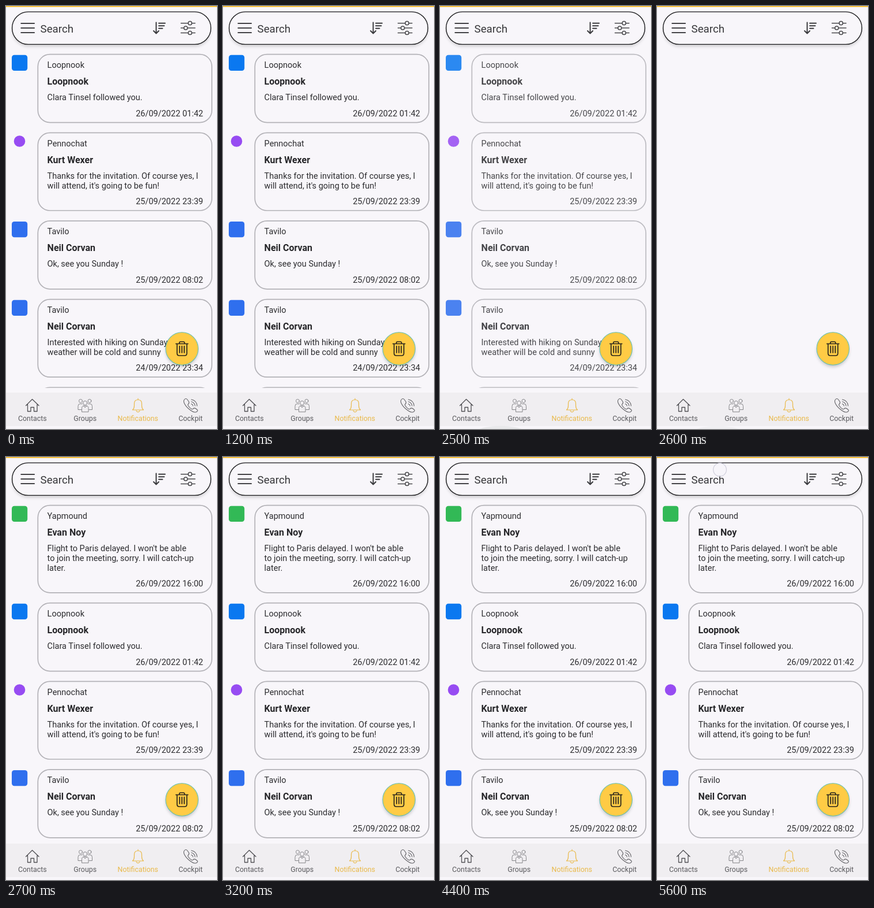
Write an HTML page that moves like this. It is 366 px wide and 732 px high and loops after 5700 ms.

```html
<!DOCTYPE html>
<html lang="en">
<head>
<meta charset="utf-8">
<title>Notifications</title>
<style>
  html, body { margin: 0; width: 100%; height: 100%; overflow: hidden; background: #f8f6fa; }
  svg { display: block; width: 100vw; height: 100vh; font-family: Roboto, "Noto Sans", sans-serif; }
  .line { fill: none; stroke-linecap: round; stroke-linejoin: round; }
  .card { fill: #f8f6fa; stroke: #b3b2b7; stroke-width: 1.7; }
  .body { font-size: 14.5px; fill: #2c2c2f; }
  .name { font-size: 16px; font-weight: 700; fill: #262629; }
  .date { text-anchor: end; }
  .tab { font-size: 12.4px; text-anchor: middle; fill: #5a5a5e; }
  .active { fill: #e9b949; }
</style>
</head>
<body>
<svg viewBox="0 0 366 732">
  <defs>
    <clipPath id="listArea"><rect y="70" width="366" height="591"/></clipPath>
    <filter id="soft" x="-20%" y="-40%" width="140%" height="190%"><feGaussianBlur stdDeviation="3"/></filter>
  </defs>
  <rect width="366" height="732" fill="#f8f6fa"/>

  <g clip-path="url(#listArea)">
    <g id="before"></g>
    <g id="after"></g>
  </g>

  <rect width="366" height="1.6" fill="#f9b81a"/>

  <g id="search">
    <rect x="12" y="14" width="342" height="55" rx="27" fill="#000" opacity=".22" filter="url(#soft)"/>
    <rect x="10.6" y="10.1" width="344.8" height="56.3" rx="28.1" fill="#f8f6fa" stroke="#19191b" stroke-width="1.4"/>
    <path d="M25.5 30.2H49.8M25.5 38.2H49.8M25.5 46.2H49.8" stroke="#2b2b2e" stroke-width="1.8"/>
    <text x="59.6" y="46" font-size="18.7" fill="#38383b">Search</text>
    <path class="line" d="M260.5 28.5V47M256 43L260.5 47.5L265 43" stroke="#3b3b3e" stroke-width="2"/>
    <path class="line" d="M265 29.8H276M265 34.3H274.5M265 38.8H271.5" stroke="#3b3b3e" stroke-width="1.9"/>
    <g class="line" stroke="#49494c" stroke-width="1.5">
      <path d="M303.5 29.7H316M322.5 29.7H328M303.5 38H308.5M315 38H328M303.5 46.5H316M322.5 46.5H328"/>
      <circle cx="319.2" cy="29.7" r="3.1"/>
      <circle cx="311.7" cy="38" r="3.1"/>
      <circle cx="319.2" cy="46.5" r="3.1"/>
    </g>
  </g>

  <g id="fab" transform="translate(305.2 593)">
    <circle cy="3.5" r="27" opacity=".26" filter="url(#soft)"/>
    <circle r="28.2" fill="#ffcb45" stroke="#62bfae" stroke-width="1.1"/>
    <path class="line" stroke="#28251c" stroke-width="1.7"
      d="M-10.5 -8.5H10.5M-4.5 -8.5V-10Q-4.5 -12 -2.5 -12H2.5Q4.5 -12 4.5 -10V-8.5M-8.5 -8.5V8Q-8.5 12 -4.5 12H4.5Q8.5 12 8.5 8V-8.5M-4 -4.5V7M0 -4.5V7M4 -4.5V7"/>
  </g>

  <g id="tabs">
    <rect y="669" width="366" height="58" fill="#f0eef1"/>
    <path class="line" d="M34.5 691.5L45.5 680.5L57 691.5M37.5 689.5V701.5H43V694.5H48.5V701.5H54V689.5" stroke="#505054" stroke-width="1.3"/>
    <g class="line" stroke="#7b7b7f" stroke-width=".9">
      <circle cx="129.5" cy="683.5" r="3"/>
      <circle cx="145" cy="683.5" r="3"/>
      <circle cx="137.2" cy="687" r="3.6"/>
      <path d="M131.5 702V696.5Q131.5 692 135 692H139.5Q143 692 143 696.5V702ZM130.5 698.5H125V692.5Q125 688.5 128.5 688.5H132M144 698.5H149.5V692.5Q149.5 688.5 146 688.5H142.5M134.5 692L137.2 695L140 692"/>
    </g>
    <path class="line" d="M219.5 699H238.5Q235.5 696.5 235.5 692V688Q235.5 681.5 229 681.5Q222.5 681.5 222.5 688V692Q222.5 696.5 219.5 699ZM226 700.5Q229 705 232 700.5M229 681V679.3" stroke="#e9b949" stroke-width="1.2"/>
    <path class="line" d="M309.5 681Q312 678 314.5 681L317 684.5Q318.5 687 316 689Q315 690 316 691.5Q318.5 695.5 322 697.5Q323.5 698.3 324.5 697Q326.5 695 329 696.5L331.5 698.5Q333.5 700 331 702Q327.5 704.5 321.5 700.5Q313 695 309.5 688Q307.3 683.5 309.5 681ZM321.5 688.5Q324 689.5 324.5 692M321.5 684.8Q327 686 328 692M321.5 681Q330.5 682.5 331.5 692" stroke="#626266" stroke-width="1.1"/>
    <text class="tab" x="45.8" y="717.5">Contacts</text>
    <text class="tab" x="137.2" y="717.5">Groups</text>
    <text class="tab active" x="228.8" y="717.5">Notifications</text>
    <text class="tab" x="320.2" y="717.5">Cockpit</text>
  </g>

  <ellipse id="ripple" cx="105" cy="738" rx="42" ry="11.5" fill="#e9e9eb"/>
  <circle id="touch" r="11.4" fill="#f6f5fb" fill-opacity=".65" stroke="#cfcedb" stroke-width="1.2"/>
</svg>

<script>
const LOOP = 5700;
const LINE = 16.6;
const TEXT_X = 71.6;
const byId = id => document.getElementById(id);

const apps = {
  Loopnook: { color: '#0a78f0' },
  Pennochat: { color: '#974cf2', round: true },
  Tavilo: { color: '#2f6fee' },
  Yapmound: { color: '#32b956' }
};

const messages = [
  ['Yapmound', 'Evan Noy', '26/09/2022 16:00',
    "Flight to Paris delayed. I won't be able", 'to join the meeting, sorry. I will catch-up', 'later.'],
  ['Loopnook', 'Loopnook', '26/09/2022 01:42', 'Clara Tinsel followed you.'],
  ['Pennochat', 'Kurt Wexer', '25/09/2022 23:39',
    'Thanks for the invitation. Of course yes, I', "will attend, it's going to be fun!"],
  ['Tavilo', 'Neil Corvan', '25/09/2022 08:02', 'Ok, see you Sunday !'],
  ['Tavilo', 'Neil Corvan', '24/09/2022 23:34',
    'Interested with hiking on Sunday ? The', 'weather will be cold and sunny'],
  ['Tavilo', 'Neil Corvan', '24/09/2022 20:15', 'Hello !']
];

const text = (kind, x, y, value) => `<text class="${kind}" x="${x}" y="${y}">${value}</text>`;

function badge({ color, round }) {
  return round
    ? `<circle cx="23.5" cy="15.2" r="9.8" fill="${color}"/>`
    : `<rect x="10" y="1.8" width="27.2" height="27.2" rx="4.5" fill="${color}"/>`;
}

function card(y, [app, name, date, ...lines]) {
  const extra = (lines.length - 1) * LINE;
  return `<g transform="translate(0 ${y})">${badge(apps[app])}
    <rect class="card" x="55.3" y=".6" width="301.8" height="${118 + extra}" rx="21"/>
    ${text('body', TEXT_X, 24, app)}
    ${text('name', TEXT_X, 52.8, name)}
    ${lines.map((line, i) => text('body', TEXT_X, 80.3 + i * LINE, line)).join('')}
    ${text('body date', 342, 107.8 + extra, date)}
  </g>`;
}

function fillList(id, items) {
  let y = 83;
  byId(id).innerHTML = items.map(item => {
    const markup = card(y, item);
    y += 135.8 + (item.length - 4) * LINE;
    return markup;
  }).join('');
}

// Each step is [start in ms, style], held until the next step.
function play(id, steps) {
  const frames = steps.map(([ms, style]) => ({
    ...style, offset: Math.max(0, ms - 1) / LOOP, easing: 'step-end'
  }));
  frames.push({ ...steps.at(-1)[1], offset: 1 });
  byId(id).animate(frames, { duration: LOOP, iterations: Infinity });
}

const show = (opacity = 1) => ({ opacity });
const touchAt = (y, opacity = 1) => ({ opacity, transform: `translate(109px, ${y}px)` });

fillList('before', messages.slice(1));
fillList('after', messages.slice(0, 4));

play('before', [[0, show()], [2500, show(.86)], [2600, show(0)]]);
play('after', [[0, show(0)], [2700, show()]]);
play('ripple', [[0, show(0)], [2500, show()], [2600, show(.5)], [2700, show(0)]]);
play('touch', [[0, touchAt(456, 0)], [5500, touchAt(456)], [5600, touchAt(22)]]);
</script>
</body>
</html>
```
